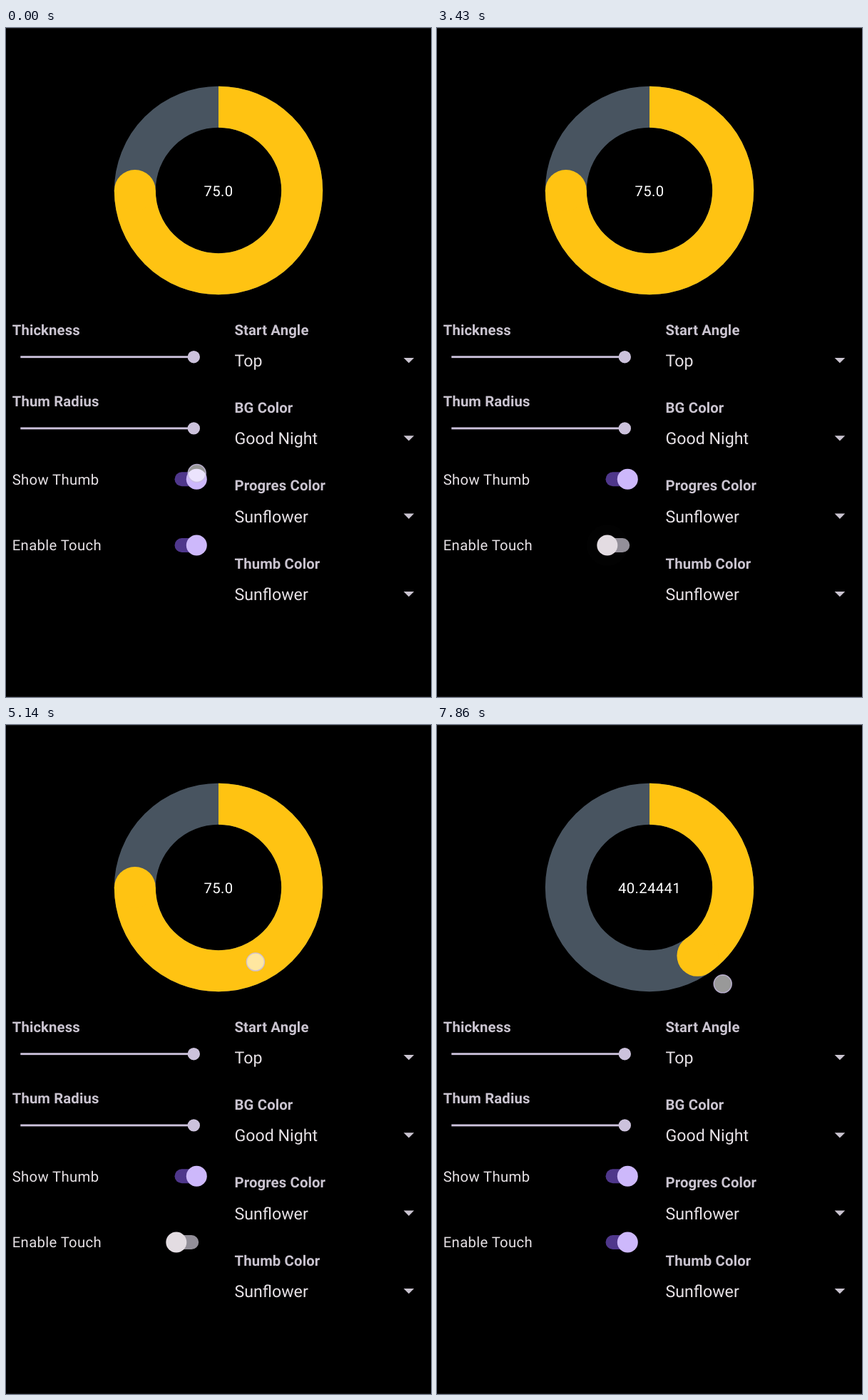
An HTML page with a canvas that plays this animation: 596 px wide and 939 px high, repeating every 8000 ms.

```html
<!DOCTYPE html>
<html lang="en">
<head>
<meta charset="utf-8">
<title>Circular progress settings</title>
<style>
  html, body { margin: 0; width: 100%; height: 100%; overflow: hidden; background: #000; }
  canvas { display: block; }
</style>
</head>
<body>
<canvas id="stage" width="596" height="939"></canvas>
<script>
const ctx = document.getElementById('stage').getContext('2d');
const LOOP = 8000, FPS = 7, TAU = Math.PI * 2;
const RING = { x: 298, y: 228, r: 117.2, w: 58 };
const SUNFLOWER = '#ffc312', NIGHT = '#485460';
const LABEL = '#cac4d0', TEXT = '#e6e1e5', ACCENT = '#ccc2dc';

const clamp = (v, lo, hi) => Math.min(hi, Math.max(lo, v));

function disc(x, y, r, fill) {
  ctx.fillStyle = fill;
  ctx.beginPath();
  ctx.arc(x, y, r, 0, TAU);
  ctx.fill();
}

function text(str, x, y, { size = 20.28, weight = 400, color = TEXT, spacing = 0, align = 'left' } = {}) {
  ctx.font = `${weight} ${size}px Roboto, sans-serif`;
  ctx.textRendering = 'geometricPrecision';
  ctx.letterSpacing = spacing + 'px';
  ctx.textAlign = align;
  ctx.fillStyle = color;
  ctx.fillText(str, x, y);
}

const heading = (str, x, y) => text(str, x, y, { weight: 700, color: LABEL, spacing: 0.145 });

// Point at a clockwise angle from the top of the ring.
function polar(deg, r) {
  const a = deg * Math.PI / 180;
  return [RING.x + r * Math.sin(a), RING.y - r * Math.cos(a)];
}

function arc(turn, color) {
  ctx.strokeStyle = color;
  ctx.lineWidth = RING.w;
  ctx.beginPath();
  ctx.arc(RING.x, RING.y, RING.r, -TAU / 4, turn * TAU - TAU / 4);
  ctx.stroke();
}

function dial(value, showThumb) {
  arc(1, NIGHT);
  arc(value / 100, SUNFLOWER);
  if (showThumb) disc(...polar(value * 3.6, RING.r), RING.w / 2, SUNFLOWER);
  const label = value === 75 ? '75.0' : value.toFixed(5);
  text(label, RING.x, 236.4, { color: '#fff', spacing: 0.36, align: 'center' });
}

function slider(label, y) {
  heading(label, 8.7, y - 30.8);
  ctx.fillStyle = ACCENT;
  ctx.fillRect(20.3, y - 1.45, 243, 2.9);
  disc(263.3, y, 8.7, ACCENT);
}

function dropdown(label, value, row) {
  const y = 109.3 * row;
  heading(label, 320.5, y + 430.8);
  text(value, 320.5, y + 475.1, { size: 23.18 });
  ctx.fillStyle = LABEL;
  ctx.beginPath();
  ctx.moveTo(557.6, y + 463);
  ctx.lineTo(572.2, y + 463);
  ctx.lineTo(564.9, y + 470.3);
  ctx.fill();
}

// A switch starts on and flips at each given step.
function switchState(step, flips) {
  const done = flips.filter(f => f <= step);
  const on = done.length % 2 === 0;
  const age = done.length ? step - done[done.length - 1] : 9;
  const slide = clamp((age + 1) / 2, 0, 1);
  return { on, age, pos: on ? slide : 1 - slide };
}

function toggle(label, y, { on, age, pos }) {
  text(label, 8.7, y + 7.4, { spacing: 0.36 });
  const x = 238.8 + 28.5 * pos;
  const color = on ? '#cdb8fb' : '#e3dce2';
  ctx.globalAlpha = [0.08, 0.05, 0.022, 0.006][age] || 0;
  disc(x, y, 29, color);
  ctx.globalAlpha = 1;
  ctx.fillStyle = on ? '#4f378b' : '#938f99';
  ctx.beginPath();
  ctx.roundRect(236.5, y - 10, 33.7, 20, 10);
  ctx.fill();
  disc(x, y, 14.5, color);
}

function touchPoint(step) {
  const within = (a, b) => step >= a && step <= b;
  if (step === 0 || within(8, 9)) return [267.7, 625];
  if (within(19, 20) || within(48, 49)) return [264, 720];
  if (within(27, 40)) return polar(Math.min(270, 36.6 + 39 * Math.abs(step - 33)), 116.7);
  if (step >= 51) return polar(Math.min(270, 258 - 38.4 * (step - 52)), 100 + 23.3 * Math.max(-0.2, step - 52));
  return null;
}

function pointer([x, y]) {
  disc(x, y, 12.5, 'rgba(255,255,255,.6)');
  ctx.strokeStyle = 'rgba(200,188,225,.85)';
  ctx.lineWidth = 1.5;
  ctx.stroke();
}

function draw(time) {
  const step = Math.floor((time % LOOP + 5) * FPS / 1000);
  const thumb = switchState(step, [1, 10]);
  const touch = switchState(step, [21, 50]);
  const value = step < 52 ? 75 : 75.16664 - 34.92223 * (Math.min(step, 55) - 52) / 3;

  ctx.fillStyle = '#000';
  ctx.fillRect(0, 0, 596, 939);
  ctx.fillStyle = '#161616';
  ctx.fillRect(0, 0, 596, 1);
  ctx.fillRect(0, 938, 596, 1);

  dial(value, thumb.on);
  slider('Thickness', 461.7);
  slider('Thum Radius', 561.9);
  toggle('Show Thumb', 633.2, thumb);
  toggle('Enable Touch', 726, touch);
  dropdown('Start Angle', 'Top', 0);
  dropdown('BG Color', 'Good Night', 1);
  dropdown('Progres Color', 'Sunflower', 2);
  dropdown('Thumb Color', 'Sunflower', 3);

  const point = touchPoint(step);
  if (point) pointer(point);
}

const start = performance.now();
function tick() {
  draw(performance.now() - start);
  requestAnimationFrame(tick);
}
tick();
</script>
</body>
</html>
```
